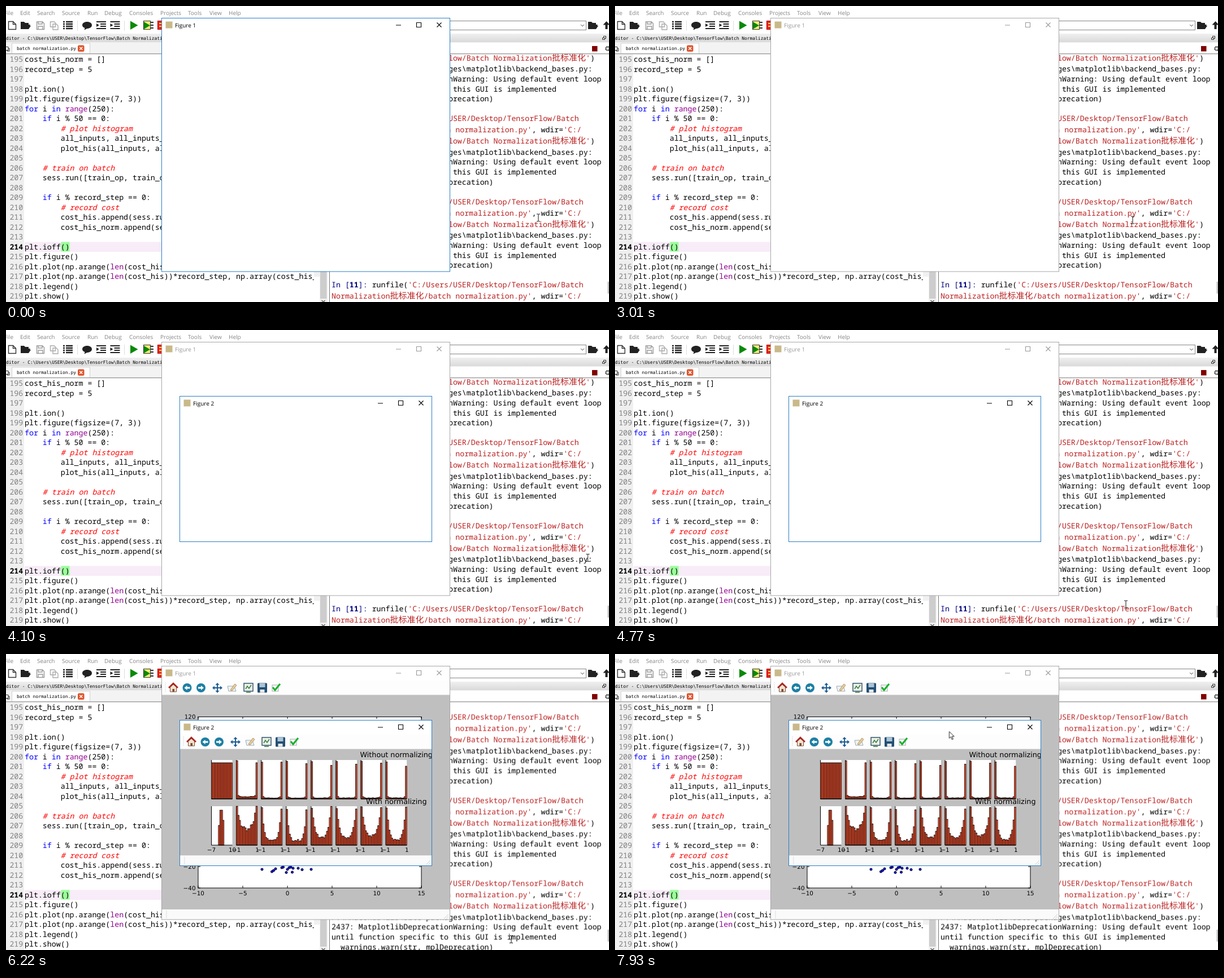
Recreate the animation shown at these times as an HTML page. Size 1067 by 525 pixels, loop 8 s.

```html
<!DOCTYPE html>
<html lang="en">
<head>
<meta charset="utf-8">
<title>Batch normalization</title>
<style>
html, body { margin: 0; width: 100%; height: 100%; overflow: hidden; background: #fff; }
svg { display: block; width: 1067px; height: 525px; }
text { white-space: pre; text-rendering: geometricPrecision; }
.code { font: 13.27px 'Noto Sans Mono', 'DejaVu Sans Mono', monospace; }
.cjk { font: 15px 'Noto Sans CJK SC', 'Noto Sans CJK', sans-serif; }
.ui { font: 10px 'Open Sans', 'Noto Sans', sans-serif; }
.small { font: 7.93px 'DejaVu Sans Mono', monospace; }
.tick { font: 10.4px 'DejaVu Sans', sans-serif; text-anchor: middle; }
.heading { font: 12.75px 'DejaVu Sans', sans-serif; text-anchor: middle; }
.keyword { fill: #00f; }
.builtin { fill: #900090; }
.comment { fill: #f00; font-style: italic; }
.str { fill: #ba2121; }
.prompt { fill: #000080; }
.bold { font-weight: bold; }
</style>
</head>
<body>
<svg id="stage" viewBox="0 0 1067 525"></svg>
<script>
const LOOP = 8000;
const ACTIVE = '#2b7ec4', INACTIVE = '#a6a6a6';

const rect = (x, y, w, h, fill, more = '') =>
  `<rect x="${x}" y="${y}" width="${w}" height="${h}" fill="${fill}" ${more}/>`;
const path = (d, fill = 'none', stroke = 'none', width = 1) =>
  `<path d="${d}" fill="${fill}" stroke="${stroke}" stroke-width="${width}"/>`;
const text = (x, y, s, cls, more = '') => `<text x="${x}" y="${y}" class="${cls}" ${more}>${s}</text>`;
const span = (cls, s) => `<tspan class="${cls}">${s}</tspan>`;
const group = (x, y, s) => `<g transform="translate(${x} ${y})">${s}</g>`;
const noise = k => { const v = Math.sin(k * 12.9898) * 43758.5453; return v - Math.floor(v); };

// Editor

const source = `cost_his_norm = []
record_step = 5

plt.ion()
plt.figure(figsize=(7, 3))
for i in range(250):
    if i % 50 == 0:
        # plot histogram
        all_inputs, all_inputs_norm = sess.run(
        plot_his(all_inputs, all_inputs_norm)

    # train on batch
    sess.run([train_op, train_op_norm],

    if i % record_step == 0:
        # record cost
        cost_his.append(sess.run(cost))
        cost_his_norm.append(sess.run(cost))

plt.ioff()
plt.figure()
plt.plot(np.arange(len(cost_his))*record_step,
plt.plot(np.arange(len(cost_his))*record_step, np.array(cost_his_
plt.legend()
plt.show()`.split('\n');

const highlight = line => line.replace(/#.*|\b(?:for|in|if|range|len)\b/g, word =>
  span(word[0] === '#' ? 'comment' : /range|len/.test(word) ? 'builtin' : 'keyword', word));

function editor() {
  const lines = source.map((line, i) => {
    const y = 99.4 + 17.5 * i, current = i === 19;
    return text(30.3, y, 195 + i, current ? 'code bold' : 'code',
        `text-anchor="end" fill="${current ? '#000' : '#808080'}"`) +
      text(33, y, highlight(line), 'code');
  });
  return rect(0, 86, 32, 439, '#efefef') + rect(33, 418.5, 522, 17.5, '#f7ecf8') +
    rect(97.5, 418.5, 15, 17, '#99ff99') +
    `<g clip-path="url(#editorClip)">${lines.join('')}</g>` +
    rect(545, 471, 10, 9, '#f0f0f0') + rect(555, 86, 14, 439, '#f0f0f0') +
    rect(556, 440, 11.5, 79, '#cdcdcd') + path('M558.5 522l3 3 3-3', 'none', '#555', 1.3);
}

// Console

const folder = 'USER/Desktop/TensorFlow/Batch';
const batch = span('cjk', '批标准化');

function run(y, n) {
  const rows = [
    [0, span('prompt', `In [${span('bold', n)}]: `) + 'runfile(' + span('str', `'C:/Users/${folder}`)],
    [20, span('str', `Normalization${batch}/batch normalization.py'`) + ', wdir=' + span('str', `'C:/`)],
    [40, span('str', `Users/${folder} Normalization${batch}'`) + ')'],
    [59.5, String.raw`F:\Anaconda\lib\site-packages\matplotlib\backend_bases.py:`],
    [77, '2437: MatplotlibDeprecationWarning: Using default event loop'],
    [94.7, 'until function specific to this GUI is implemented'],
    [112.3, '  warnings.warn(str, mplDeprecation)']
  ];
  return rows.map(([dy, s]) => text(576, y + dy + 4.3, s, 'code')).join('');
}

const consolePane = () =>
  path('M572.5 86V525', 'none', '#777') +
  `<g clip-path="url(#consoleClip)"><g id="log">${
    [8, 9, 10, 11].map((n, i) => run(52.5 + 147.5 * i, n)).join('')}</g></g>` +
  rect(1064.5, 489, 2.5, 21, '#c4c4c4');

// Main window bars

const folderIcon = x => path(`M${x} 41V28h6l2 2h6v3h3l-4 8zM${x + 3} 41l3-6h12l-4 6z`, '#222');
const indentIcon = x => path(`M${x} 28h17M${x + 7} 32h10M${x + 7} 36h10M${x} 40h17`, 'none', '#222', 2) +
  path(`M${x} 31l5 3-5 3z`, '#222');

function bars() {
  const menu = { Edit: 25, Search: 55, Source: 99, Run: 144, Debug: 174, Consoles: 218,
    Projects: 273, Tools: 322, View: 360, Help: 394 };
  const items = Object.entries(menu).map(([s, x]) => text(x, 15.5, s, 'ui')).join('');
  const list = [28, 32, 36, 40].map(y => path(`M101 ${y}h3M106 ${y}h12`, 'none', '#222', 2.5)).join('');
  return `<g fill="#858585">${text(13, 15.5, 'File', 'ui', 'text-anchor="end"')}${items}</g>` +
    path('M4.5 27.5h8l5 5v9h-13zM12.5 27.5v5h5', 'none', '#333', 1.4) + folderIcon(26) +
    path('M54.5 28h10l3 3v10.5h-13zM57 28v4h7v-4M57 41v-5h8v5', 'none', '#999', 1.4) +
    path('M78.5 28h7l2 2v7h-9zM83 32h6l3 3v7h-9z', '#fff', '#aaa', 1.4) + list +
    path('M126.5 26v18M209.5 26v18', 'none', '#ddd') +
    path('M143.5 28c5 0 8.5 2.5 8.5 6s-4 6-8.5 6l-5 2.5 1-3.5c-3-1-4.500-3-4.500-5 0-3.500 3.500-6 8.500-6z', '#222') +
    indentIcon(160) + indentIcon(184.5) +
    path('M220 26.500l13.500 7.800-13.500 7.800z', '#078a07') +
    rect(243.500, 26.500, 12, 15, '#f4ec72', 'stroke="#333"') + path('M244 28l11 6.500-11 6.500z', '#078a07') +
    path('M256 29h5M256 34h5M256 39h5', 'none', '#333', 2) +
    rect(268.500, 26.500, 12, 15, '#e22', 'stroke="#a00"') + path('M271 31h6M271 36h6', 'none', '#fd4', 2) +
    rect(700.500, 26.500, 326, 16, '#fff', 'stroke="#858585"') +
    path('M1017 33l3 3 3-3', 'none', '#555') + folderIcon(1030) +
    path('M1062.500 27l-6 6.500h4V41h4v-7.500h4z', '#222') +
    rect(0, 49, 1067, 15.500, 'url(#dock)') +
    text(-4.700, 59.500, String.raw`Editor - C:\Users\USER\Desktop\TensorFlow\Batch Normalization`, 'small') +
    path('M1055.500 56.500h4v3h-4zM1057.500 56v-2.500h4v4h-2', 'none', '#333') +
    rect(0, 65, 570, 19.500, '#f3f3f3') + path('M10.500 84V66h138v18', '#fff', '#d0d0d0') +
    path('M0 72.500h4v6h-4M2 78v2h4v-5h-2', 'none', '#333') +
    text(19, 78, 'batch normalization.py', 'small') +
    rect(127, 69.500, 11.500, 11.500, '#e0562f', 'rx="2.500"') +
    path('M130.300 72.800l5 5m0-5l-5 5', 'none', '#fff', 1.500) +
    path('M0 84.800h570M572 84.800h495', 'none', '#777') +
    rect(1037, 71, 9.500, 9.500, '#800000') +
    `<circle cx="1064.500" cy="75.500" r="3.200" fill="none" stroke="#333" stroke-width="2.200" stroke-dasharray="1.800 .7"/>`;
}

// Figure windows

const toolIcons = [
  [20.5, path('M-8 0L0-8 8 0', 'none', '#b3201e', 2.5) + path('M-5.5-1L0-6l5.5 5v8h-11z', '#f1e3d0', '#7c4a33') + rect(-1.5, 2, 3.500, 5, '#7c4a33')],
  [45, '<circle r="8" fill="#1c7fa3"/>' + path('M-5 0l5-4v2.500h5v3h-5V4z', '#fff')],
  [69.5, '<circle r="8" fill="#1c7fa3"/>' + path('M5 0L0-4v2.500h-5v3h5V4z', '#fff')],
  [98.5, path('M-6 0H6M0-6V6', 'none', '#1f5d92', 2) + path('M0-9l3.500 4h-7zM0 9l3.500-4h-7zM-9 0l4-3.500v7zM9 0L5-3.500v7z', '#1f5d92')],
  [124.5, path('M-8-3H4l3 9H-6z', '#eef2f4', '#9aa9b0') + path('M-3 4L5-7l3 2.500L0 5z', '#e6cfa0', '#b69159')],
  [153.5, rect(-8, -8, 16, 14, '#e9f1e6', 'stroke="#34566b" stroke-width="1.500"') + path('M-5 2l3-5 3 4 4-6M-4 8H4', 'none', '#3a7a45', 1.5)],
  [178, rect(-8.5, -8.5, 17, 17, '#244f74', 'rx="1.500"') + rect(-5, -8, 10, 7, '#a9c4d6') + rect(-4, 3, 8, 5.500, '#e8e8e8')],
  [202.5, rect(-7, -5, 11, 11, '#f8f8f8', 'stroke="#aaa"') + path('M-6-1l4 5L7-7', 'none', '#16b22c', 3)]
].map(([x, icon]) => group(x, 38.5, icon)).join('');

function figure(id, x, y, w, h, n, plot) {
  const title = rect(7, 6, 12, 12, '#c9b98a') +
    text(23.5, 16, `Figure ${n}`, 'ui', 'fill="currentColor"') +
    path(`M${w - 95.5} 12.500h9M${w - 59} 8h8v8h-8zM${w - 23} 8l8 8m0-8l-8 8`, 'none', 'currentColor', 1.1);
  const tools = rect(1, 25, w - 2, 26, '#fdfdfd') +
    `<path d="M6.500 29v18" stroke="#bbb" stroke-dasharray="1 2"/>` + toolIcons +
    rect(.5, 51, w - 1, h - 69, '#bfbfbf') + rect(.5, h - 18, w - 1, 17.500, '#fafafa') +
    path(`M8.500 ${h - 16}v14`, 'none', '#ddd') +
    `<path d="M${w - 10} ${h - 2}l8-8M${w - 6} ${h - 2}l4-4" stroke="#aaa" stroke-dasharray="1.500 1.300"/>`;
  return `<g id="${id}">` + group(x, y, rect(0, 0, w, h, '#fff') + `<g class="title">${title}</g>`) +
    `<g class="plot">${group(x, y, tools)}${plot}</g>` +
    group(x, y, `<rect class="frame" width="${w}" height="${h}" fill="none" stroke="${ACTIVE}"/>`) + '</g>';
}

function scatter() {
  const dots = [[453, 382], [470.5, 386], [473.5, 384], [477, 381], [488, 379], [490.5, 378], [496, 387.5],
    [498, 382], [501, 379], [504, 378], [506.5, 387], [508, 380], [517, 380], [524, 382.5], [540, 382]];
  let s = rect(340, 111.5, 395, 303.5, '#fff', 'stroke="#000"');
  for (let i = 0; i <= 5; i++) {
    const x = 340 + 79 * i, value = 5 * i - 10;
    s += path(`M${x} 111v4M${x} 415v-4`, 'none', '#000') +
      text(x, 427.5, String(value).replace('-', '−'), 'tick');
  }
  for (let v = -40; v <= 120; v += 20) {
    const y = 415 - (v + 40) * 1.897;
    s += path(`M340 ${y}h4M735 ${y}h-4`, 'none', '#000') +
      text(335.5, y + 3.7, String(v).replace('-', '−'), 'tick', 'style="text-anchor:end"');
  }
  return s + dots.map(([x, y]) =>
    `<circle cx="${x}" cy="${y}" r="2.100" fill="#00f" stroke="#000" stroke-width=".9"/>`).join('');
}

const BINS = 15, PANEL = 37, BIN = PANEL / BINS;

function panel(x, top, height) {
  let s = rect(x, top, PANEL, 69, '#fff');
  for (let i = 0; i < BINS; i++) {
    const h = Math.min(69, height(i, i / (BINS - 1) * 2 - 1));
    if (h > 0) s += rect(x + i * BIN, top + 69 - h, BIN, h, '#ff5733', 'stroke="#000" stroke-width=".85"');
  }
  return s + path(`M${x} ${top}v69h${PANEL}`, 'none', '#000');
}

function histograms() {
  // floor, rise and steepness of each U shape
  const bowls = [[25, 42, 2.4], [9, 56, 4], [8, 54, 5], [13, 54, 3], [13, 50, 3.2], [16, 50, 2.8], [9, 58, 3.5]];
  const peak = { 5: 35, 6: 62, 7: 62, 8: 44 };
  let s = '';
  for (let c = 0; c < 8; c++) {
    const x = 363.5 + 44.1 * c;
    const [floor, rise, power] = bowls[c - 1] || [];
    s += panel(x, 188, (i, u) => !c ? 64 : i === 0 ? 65 + 3 * noise(c) : i === BINS - 1 ? 58 + 11 * noise(c + 20) :
      (c === 1 ? 3.5 : 1.2) + 7 * u ** 8 + noise(c * 20 + i));
    s += panel(x, 270, (i, u) => !c ? peak[i] || 0 :
      floor + rise * Math.abs(u) ** power + (c === 1 ? 10 : 4) * (noise(c * 31 + i) - .4));
    s += text(x, 351, c ? '−1' : '−7', 'tick') + text(x + PANEL, 351, c ? '1' : '10', 'tick');
  }
  return s + text(690.7, 183, 'Without normalizing', 'heading') + text(690.7, 266, 'With normalizing', 'heading');
}

// Stage

document.getElementById('stage').innerHTML = `<defs>
  <clipPath id="editorClip"><rect y="86" width="545" height="439"/></clipPath>
  <clipPath id="consoleClip"><rect x="573" y="85.500" width="491" height="440"/></clipPath>
  <linearGradient id="dock" x2="0" y2="1"><stop stop-color="#f0f0f0"/><stop offset="1" stop-color="#d9d9d9"/></linearGradient>
</defs>` + bars() + editor() + consolePane() +
  figure('back', 275.5, 21.5, 510, 449.5, 1, scatter()) +
  figure('front', 307.5, 117.5, 446, 258, 2, histograms()) +
  `<g id="beam">${path('M-3-6.500h2.200L0-5.800.8-6.500H3M0-6V6M-3 6.500h2.200L0 5.800.8 6.500H3', 'none', '#111')}</g>
  <g id="arrow">${path('M0 0v12l2.800-2.600 2 4.800 2-.8-2-4.700H8.700z', '#fff', '#000', .9)}</g>`;

// Timeline: each step holds until the next one

function play(selector, steps) {
  const frames = steps.map(([ms, props]) => ({ offset: ms / LOOP, easing: 'step-end', ...props }));
  frames.push({ ...frames[frames.length - 1], offset: 1 });
  for (const el of document.querySelectorAll(selector))
    el.animate(frames, { duration: LOOP, iterations: Infinity });
}
const at = (x, y) => ({ transform: `translate(${x}px, ${y}px)`, opacity: 1 });
const hidden = { transform: 'translate(0px, 0px)', opacity: 0 };

play('#back .title', [[0, { color: '#000' }], [3010, { color: '#999' }]]);
play('#back .frame', [[0, { stroke: ACTIVE }], [3010, { stroke: INACTIVE }]]);
play('#front', [[0, { opacity: 0 }], [3290, { opacity: 1 }]]);
play('.plot', [[0, { opacity: 0 }], [6220, { opacity: 1 }]]);
play('#log', [[0, at(0, 0)], [6220, at(0, -87.5)]]);
play('#beam', [
  [0, at(942, 375.5)], [140, at(943, 375.5)], [3010, at(916, 379.5)], [3440, at(902.5, 444.5)],
  [3560, hidden], [3710, at(800.5, 507.5)], [3830, at(853, 462.5)], [3980, at(950, 430)],
  [4100, at(1029.5, 404)], [4500, at(1021.5, 404.5)], [4650, at(985, 397.5)], [4770, at(904, 486.5)],
  [4930, at(893.5, 509.5)], [5230, at(893.5, 506.5)], [5660, at(894, 506)], [6750, at(898, 501)],
  [6870, at(903, 497.5)], [7020, hidden]
]);
play('#arrow', [
  [0, hidden], [7020, at(786.5, 322.5)], [7270, at(720, 268)], [7390, at(650, 212)],
  [7510, at(586.5, 159.5)], [7660, at(578.5, 137.5)], [7810, at(585, 137.5)], [7930, at(591.5, 137.5)]
]);
</script>
</body>
</html>
```
